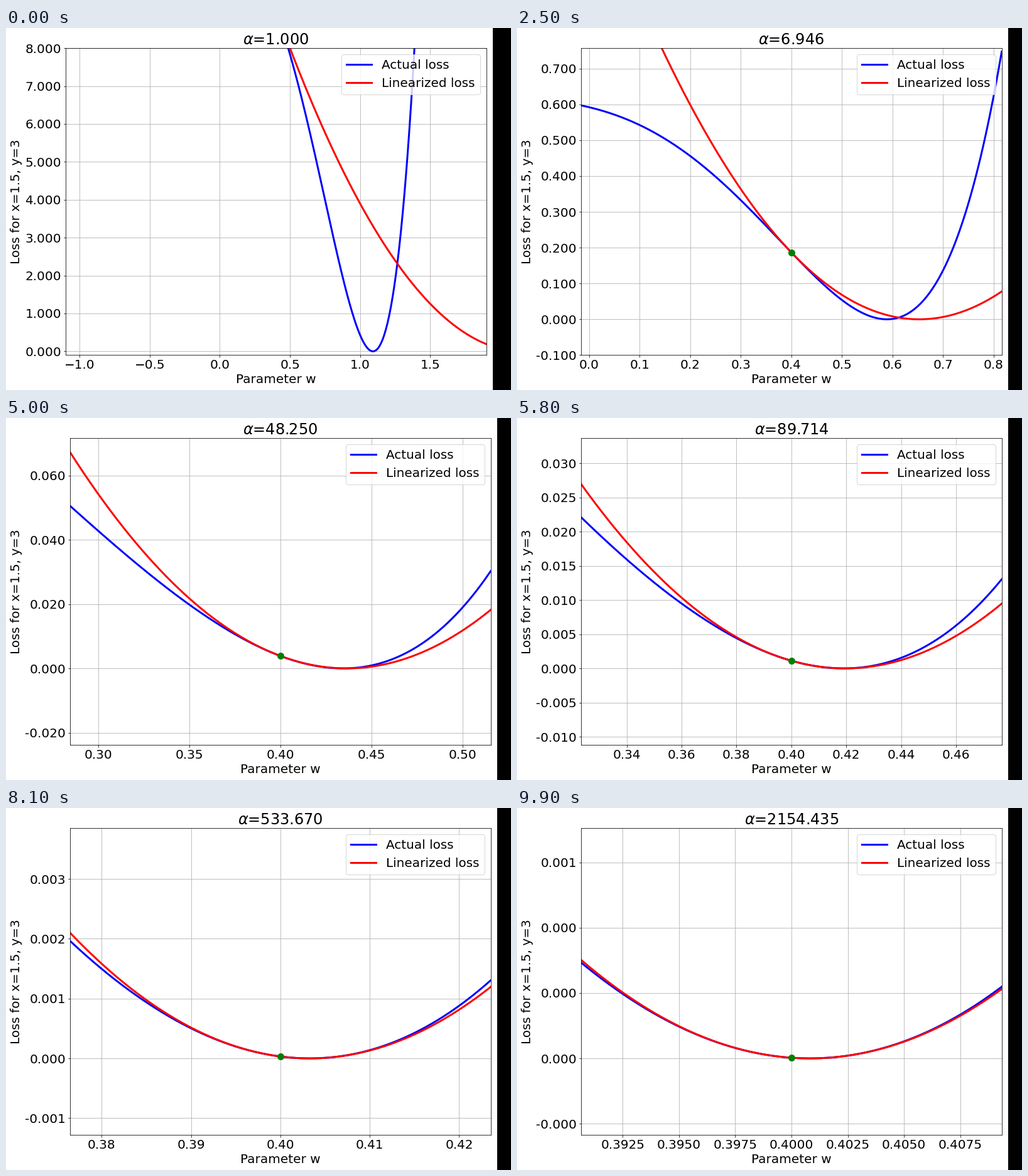
These frames come from a looping animation (804x577 px, 10 s). A matplotlib script:

```python
import numpy as np
import matplotlib.pyplot as plt
from matplotlib.animation import FuncAnimation
from matplotlib.patches import Rectangle
from matplotlib.ticker import FormatStrFormatter

DPI, W, H = 72, 804, 577
FRAMES = 100
AX_W, AX_H, AX_BOTTOM = 669.6, 489.24, 55.6
PAD, TICK = 7.2, 3.5
W0, Y = 0.4, 3

plt.rcParams.update({"font.family": "DejaVu Sans", "font.size": 20})


def model(w):
    return 1.5 * w**3 + 0.96 * w**2 + 0.22 * w


SLOPE = 4.5 * W0**2 + 1.92 * W0 + 0.22


def actual_loss(w, alpha):
    return (model(w) - model(W0) - Y / alpha) ** 2


def linear_loss(w, alpha):
    return (SLOPE * (w - W0) - Y / alpha) ** 2


fig = plt.figure(figsize=(W / DPI, H / DPI), dpi=DPI, facecolor="white")
ax = fig.add_axes([0.1, 0.1, 0.8, 0.8])
ax.grid(True)
ax.yaxis.set_major_formatter(FormatStrFormatter("%.3f"))
ax.set_xlabel("Parameter w")
ax.set_ylabel("Loss for x=1.5, y=3")
actual, = ax.plot([], [], "b", lw=3, label="Actual loss")
linear, = ax.plot([], [], "r", lw=3, label="Linearized loss")
dot, = ax.plot([], [], "go", ms=10)
ax.legend(loc="upper right")

strip = Rectangle((W, 0), W, H, transform=None, fc="black", lw=0, zorder=10)
strip.set_in_layout(False)
fig.add_artist(strip)


def place_axes(left):
    ax.set_position([left / W, AX_BOTTOM / H, AX_W / W, AX_H / H])


def crop_tight():
    """Align the labels to the left margin; the unused right side is black."""
    left = 100
    place_axes(left)
    box = fig.get_tightbbox()
    shift = PAD - box.x0 * DPI
    place_axes(left + shift)
    right = max(box.x1 * DPI, left + AX_W + TICK) + shift
    strip.set_x(int(right + PAD))


def update(i):
    alpha = 10 ** (i * 10 / 3 / (FRAMES - 1))
    half = 1.5 * 0.95**i
    top = 8 * 0.91**i
    w = np.linspace(W0 - half, W0 + half, 500)
    actual.set_data(w, actual_loss(w, alpha))
    linear.set_data(w, linear_loss(w, alpha))
    dot.set_data([W0], [actual_loss(W0, alpha)])
    ax.set_xlim(w[0], w[-1])
    ax.set_ylim(-min(0.1, top / 3), top)
    ax.set_title(rf"$\alpha$={alpha:.3f}")
    crop_tight()
    return actual, linear, dot


anim = FuncAnimation(fig, update, frames=FRAMES, interval=100,
                     repeat=True, repeat_delay=0)
plt.show()
```
